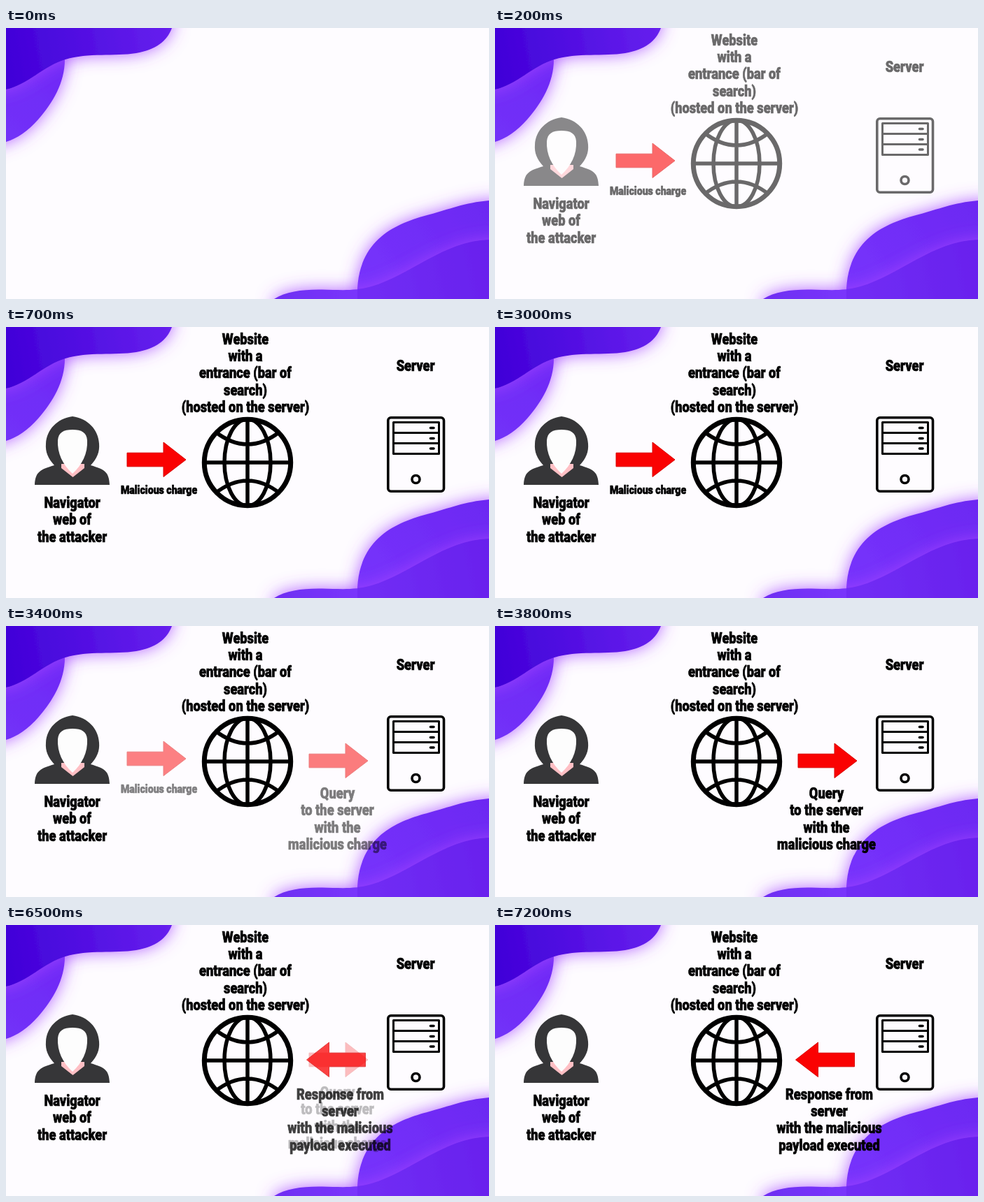
Write an HTML page that moves like this. It is 690 px wide and 388 px high and loops after 8000 ms.

```html
<!DOCTYPE html>
<html lang="en">
<head>
<meta charset="utf-8">
<title>Request flow of an injected payload</title>
<style>
  html, body { margin: 0; width: 100%; height: 100%; overflow: hidden; background: #fefcff; }
  svg { display: block; width: 100vw; height: 100vh; }
  text {
    font-family: Roboto, "Open Sans", "Liberation Sans", sans-serif;
    font-weight: 900; text-anchor: middle;
    fill: #000; stroke: #000; stroke-width: .7px;
  }
</style>
</head>
<body>
<svg viewBox="0 0 690 388">
  <defs>
    <linearGradient id="deep" gradientUnits="userSpaceOnUse" x1="0" y1="50" x2="235" y2="10">
      <stop offset="0" stop-color="#4000d8"/><stop offset="1" stop-color="#6620ee"/>
    </linearGradient>
    <linearGradient id="mid" gradientUnits="userSpaceOnUse" x1="85" y1="50" x2="10" y2="150">
      <stop offset="0" stop-color="#6e2af6"/><stop offset="1" stop-color="#7230f8"/>
    </linearGradient>
    <linearGradient id="hill" gradientUnits="userSpaceOnUse" x1="510" y1="370" x2="690" y2="250">
      <stop offset="0" stop-color="#7632fc"/><stop offset="1" stop-color="#6c28f2"/>
    </linearGradient>
    <linearGradient id="wave" gradientUnits="userSpaceOnUse" x1="383" y1="388" x2="690" y2="330">
      <stop offset="0" stop-color="#6e2ef2"/><stop offset=".4" stop-color="#7a36fc"/><stop offset="1" stop-color="#6e26f2"/>
    </linearGradient>
    <filter id="glow" filterUnits="userSpaceOnUse" x="-60" y="-60" width="810" height="510">
      <feDropShadow dx="0" dy="0" stdDeviation="12" flood-color="#a444ff" flood-opacity=".85"/>
    </filter>
    <path id="hillShape" d="M690 247C655 250 632 260 605 267C556 280 499 303 502 388V430H740V247Z"/>
    <path id="waveShape" d="M383 388C400 377 425 374 452 374.500C478 375 498 377 522 370C578 354 625 305 690 303H740V430H383Z"/>
    <clipPath id="waveClip"><use href="#waveShape"/></clipPath>
    <path id="arrow" d="M-84 -9.800H-32V-25L0 0L-32 24.500V9.800H-84Z" fill="#fa0202" stroke="#d80000"/>
  </defs>

  <path filter="url(#glow)" fill="url(#mid)" d="M-50 -50H84V45C84 78 67 107 46 131C31 148 16 158 0 163L-50 180Z"/>
  <path filter="url(#glow)" fill="url(#deep)" d="M-50 -50H237V0C230 19 214 31 186 36C155 41 118 35 85 45C54 54 30 82 0 88L-50 98Z"/>
  <use href="#hillShape" filter="url(#glow)" fill="url(#hill)"/>
  <use href="#waveShape" filter="url(#glow)" fill="url(#wave)"/>
  <use href="#hillShape" clip-path="url(#waveClip)" fill="#5510dc" opacity=".22"/>

  <g id="scene">
    <g id="attacker">
      <path fill="#363638" d="M41 226C42 207 49 204 69 198C60 188 56 179 57 167C58 147 73 131 95 128C117 131 132 147 133 167C134 179 130 188 121 198C141 204 147 207 148 226Z"/>
      <path fill="#ffbfc4" d="M79 196H112V202L95.500 215L79 202Z"/>
      <path fill="#fdfdfd" d="M95 147C108 147 115 151 116 162C117 181 109 197 95 210C81 197 73 181 74 162C75 151 82 147 95 147Z"/>
    </g>
    <g id="globe" fill="none" stroke="#000" stroke-width="5.500">
      <circle cx="345" cy="194" r="61.700" stroke-width="7"/>
      <ellipse cx="345" cy="194" rx="33" ry="62"/>
      <path d="M345 132V256M283 194H407M299 150Q345 186 391 150M299 238Q345 202 391 238"/>
    </g>
    <g id="server" fill="none" stroke="#000" stroke-width="3.600">
      <rect x="545.800" y="129.800" width="79.700" height="105.400" rx="4"/>
      <path stroke-width="3" stroke-linejoin="round" d="M553.500 136.500H618.500V181.500H553.500ZM553.500 151.500H618.500M553.500 166.500H618.500"/>
      <path stroke-linecap="round" d="M606.500 144.500H611M606.500 159.500H611M606.500 174H611"/>
      <circle cx="585.500" cy="218" r="5.500"/>
    </g>
  </g>
  <g id="charge"><use href="#arrow" transform="translate(257 190)"/></g>
  <g id="query"><use href="#arrow" transform="translate(517 193)"/></g>
  <g id="reply"><use href="#arrow" transform="translate(429.500 193) scale(-1 1)"/></g>
</svg>
<script>
  const LOOP = 8000, STEP = 100, FADE = 500, LEADING = 24.4;
  const CONDENSE = 0.83;   // one narrow cut for all lettering
  const $ = id => document.getElementById(id);

  function label(parent, x, y, lines, size = 22) {
    lines.forEach((line, i) => {
      const el = document.createElementNS("http://www.w3.org/2000/svg", "text");
      el.setAttribute("transform", `translate(${x} ${y + i * LEADING}) scale(${CONDENSE} 1)`);
      el.setAttribute("font-size", size);
      el.textContent = line;
      $(parent).append(el);
    });
  }

  label("scene", 342, 24.5, ["Website", "with a", "entrance (bar of", "search)", "(hosted on the server)"]);
  label("scene", 585, 62.5, ["Server"]);
  label("scene", 94.5, 259, ["Navigator", "web of", "the attacker"]);
  label("charge", 218.5, 238.5, ["Malicious charge"], 17);
  label("query", 473.5, 247, ["Query", "to the server", "with the", "malicious charge"]);
  label("reply", 477.5, 249.5, ["Response from", "server", "with the malicious", "payload executed"]);

  const ramp = (t, start) => Math.min(1, Math.max(0, (t - start) / FADE));
  const easeOut = k => Math.sin(k * Math.PI / 2);

  function draw(ms) {
    const t = Math.floor(ms % LOOP / STEP) * STEP;
    const intro = easeOut(ramp(t, 0));
    const toQuery = easeOut(ramp(t, 3230));
    const toReply = easeOut(ramp(t, 6230));
    $("scene").style.opacity = intro;
    $("charge").style.opacity = intro * (1 - toQuery);
    $("query").style.opacity = toQuery * (1 - toReply);
    $("reply").style.opacity = toReply;
  }

  const start = performance.now();
  function tick() {
    draw(performance.now() - start);
    requestAnimationFrame(tick);
  }
  tick();
</script>
</body>
</html>
```
